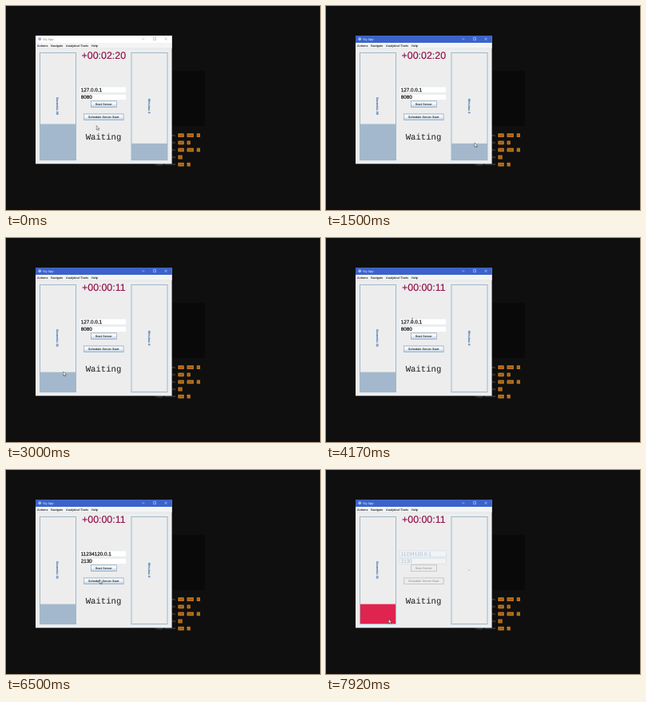
Write an HTML page that moves like this. It is 393 by 255 pixels and loops after 8000 ms.

```html
<!DOCTYPE html>
<html lang="en">
<head>
<meta charset="utf-8">
<title>My App</title>
<style>
  html, body { margin: 0; width: 100%; height: 100%; overflow: hidden; background: #0f0f0f; }
  svg { display: block; width: 393px; height: 255px; }
  text { font-family: "Liberation Sans", Arial, sans-serif; text-rendering: geometricPrecision; white-space: pre; }
  .mid { text-anchor: middle; }
  .small { font-size: 3.7px; font-weight: 700; fill: #2c2c2c; }
  .hint { font-size: 3.7px; fill: #666; text-anchor: end; }
  .key { fill: #bd7420; }
  .keytext { font-size: 2.8px; fill: #5a3608; text-anchor: middle; }
  .clock { font-size: 12.4px; fill: #8c0a42; stroke: #8c0a42; stroke-width: .12; }
  .status { font: 400 10.6px "Liberation Mono", "Courier New", monospace; fill: #1c1c1c; }
  .bar { fill: none; stroke: #9db8cc; stroke-width: 1; }
  .fill { fill: #a3b8cc; }
  .barlabel { font-size: 3.75px; font-weight: 700; fill: #4f7cb0; stroke: #4f7cb0; stroke-width: .15; text-anchor: middle; }
  .field rect { fill: #fff; stroke: #dde1e5; stroke-width: .4; }
  .field text { font-size: 6.3px; fill: #1c1c1c; stroke: #1c1c1c; stroke-width: .25; }
  .field .sel { fill: #b8cfe5; stroke: none; }
  .field .caret { stroke: #222; stroke-width: .3; }
  .button rect { fill: url(#face); stroke: #849bb4; stroke-width: .6; }
  .button.pressed rect { fill: #a9c2da; }
  .off .field rect { fill: #f3f3f3; stroke: #b8cfe5; }
  .off .field text { fill: #9db9d3; stroke: none; }
  .off .button rect { fill: #ececec; stroke: #b0b0b0; }
  .off .button text { fill: #a2a2a2; }
  .off #secFill { fill: #e02450; }
  #bar { fill: #fff; }
  .chrome { fill: none; stroke: #999; stroke-width: .5; }
  .title { font-size: 4px; fill: #888; }
  .active #bar { fill: #3b63c9; }
  .active .chrome { stroke: #e8eefc; }
  .active .title { fill: #e8eefc; }
</style>
</head>
<body>
<svg viewBox="0 0 393 255">
  <defs>
    <linearGradient id="face" x2="0" y2="1">
      <stop offset="0" stop-color="#e2ebf4"/>
      <stop offset=".35" stop-color="#fbfdff"/>
      <stop offset="1" stop-color="#b8cfe5"/>
    </linearGradient>
  </defs>
  <rect width="393" height="255" fill="#0f0f0f"/>
  <rect x="180" y="81" width="69" height="69" fill="#090909"/>
  <g id="hints"></g>

  <g id="app">
    <rect x="37" y="37" width="170.6" height="160.3" fill="#ededed"/>
    <rect id="bar" x="37" y="37" width="170.6" height="9"/>
    <circle cx="42.2" cy="41.3" r="2" fill="#a9b4cc"/>
    <text class="title" x="46.2" y="42.7">My App</text>
    <path class="chrome" d="M170.3 41.2h3M184.6 39.6h3v3h-3zM198.6 39.6l3 3m0-3l-3 3"/>
    <rect x="37" y="46" width="170.6" height="6.8" fill="#f4f4f4"/>
    <path d="M37 52.9h170.6" stroke="#d8d8d8" stroke-width=".4"/>
    <g class="small">
      <text x="39" y="50.6">Actions</text>
      <text x="56" y="50.6">Navigate</text>
      <text x="75" y="50.6">Analytical Tools</text>
      <text x="107" y="50.6">Help</text>
    </g>

    <rect id="secFill" class="fill" x="42.5" width="45"/>
    <rect class="bar" x="42.5" y="58.5" width="45" height="134"/>
    <text id="secLabel" class="barlabel" transform="translate(63.3 125) rotate(90)"></text>
    <rect id="minFill" class="fill" x="157" width="45"/>
    <rect class="bar" x="157" y="58.5" width="45" height="134"/>
    <text id="minLabel" class="barlabel" transform="translate(177.8 125) rotate(90)"></text>

    <text id="clock" class="clock mid" x="122.3" y="66.4"></text>
    <g id="host" class="field" transform="translate(92 101)"></g>
    <g id="port" class="field" transform="translate(92 110.4)"></g>
    <g class="button">
      <rect x="106.3" y="118.8" width="32" height="7.7"/>
      <text class="small mid" x="122.3" y="124">Start Server</text>
    </g>
    <g id="schedule" class="button">
      <rect x="97.3" y="134.9" width="49.8" height="7.7"/>
      <text class="small mid" x="122.2" y="140.2">Schedule Server Start</text>
    </g>
    <text class="status mid" x="122" y="166.6">Waiting</text>
  </g>

  <g id="cursor">
    <path id="arrow" d="M0 0V5.2L1.2 4.1 2 6 2.9 5.6 2.1 3.8H3.7Z" fill="#fff" stroke="#222" stroke-width=".45"/>
    <path id="beam" d="M-.9 0H.9M0 0V5.4M-.9 5.4H.9" fill="none" stroke="#222" stroke-width=".4"/>
  </g>
</svg>
<script>
const LOOP = 8000, STEP = 1000 / 12;
const BOTTOM = 192.2, SEC_UNIT = 134 / 60, MIN_UNIT = 10.2, EM = 6.3;
const $ = id => document.getElementById(id);

// time, x, y of the pointer tip
const path = [
  [0, 113.3, 149.6], [40, 113.3, 149.6], [420, 172.3, 168],
  [900, 172.3, 168], [1250, 185.7, 163], [1340, 185.7, 163], [1500, 186, 171],
  [1670, 186, 171], [1920, 186, 192], [2000, 183, 197], [2500, 71, 153],
  [2670, 71.3, 154], [3000, 71.7, 167], [3250, 71.7, 167], [3580, 143, 134],
  [3670, 143, 134], [3920, 108, 100], [4250, 108, 100.3], [4500, 98, 101.3],
  [5750, 98, 101.3], [5830, 104.5, 111], [5920, 94.5, 111.2],
  [6250, 94.5, 111.2], [6500, 117.2, 137], [7580, 117.2, 137], [7920, 78, 187]
];
const minutes = [[0, 2], [1830, 1], [1910, 0]];
const seconds = [[0, 20], [2750, 17], [2830, 15], [2910, 13], [3000, 11]];
// time, text, caret index, selection anchor
const host = [
  [0, "127.0.0.1"], [4330, "127.0.0.1", 3, 4], [4410, "127.0.0.1", 2, 4],
  [4500, "127.0.0.1", 1, 4], ...typed([5250, 5410, 5500, 5580, 5660, 5750], "1", "123412", "0.0.1"),
  [5830, "11234120.0.1"]
];
const port = [
  [0, "8080"], [5830, "8080", 3, 3], [5910, "8080", 0, 3],
  ...typed([6080, 6160, 6250], "", "213", "0"), [6660, "2130"]
];

function typed(times, before, word, after) {
  return times.map((at, i) => {
    const head = before + word.slice(0, i + 1);
    return [at, head + after, head.length];
  });
}

function at(list, t) {
  let now = list[0];
  for (const item of list) if (item[0] <= t) now = item;
  return now;
}

function pointer(t) {
  const i = path.findIndex(p => p[0] > t);
  if (i < 0) return path[path.length - 1].slice(1);
  const [a, b] = [path[i - 1], path[i]];
  const k = (t - a[0]) / (b[0] - a[0]);
  return [1, 2].map(n => a[n] + (b[n] - a[n]) * k);
}

const widthOf = s => [...s].reduce((w, c) => w + (c === "." ? .278 : .556), 0) * EM;

function drawField(id, [, text, caret, anchor = caret]) {
  const x = n => 1.8 + widthOf(text.slice(0, n));
  let marks = "";
  if (caret !== undefined) {
    marks = `<rect class="sel" x="${x(caret)}" y=".6" width="${x(anchor) - x(caret)}" height="6"/>` +
      `<path class="caret" d="M${x(caret)} .7v5.8"/>`;
  }
  $(id).innerHTML = `<rect width="58.5" height="7.2"/>${marks}<text x="1.8" y="5.9">${text}</text>`;
}

function setFill(id, height) {
  $(id).setAttribute("y", BOTTOM - height);
  $(id).setAttribute("height", height);
}

function drawHints() {
  const rows = [
    ["Show All Commands", "Ctrl", "Shift", "P"], ["Go to File", "Ctrl", "P"],
    ["Find in Files", "Ctrl", "Shift", "F"], ["Start Debugging", "F5"], ["Toggle Terminal", "Ctrl", "`"]
  ];
  const widths = { Ctrl: 7.5, Shift: 8.5, F5: 5.5 };
  $("hints").innerHTML = rows.map(([name, ...keys], i) => {
    const y = 161.7 + i * 9.1;
    let x = 215.3;
    return `<text class="hint" x="212" y="${y + 1.2}">${name}</text>` + keys.map(key => {
      const w = widths[key] || 4.3, left = x;
      x += w + 3.7;
      return `<rect class="key" x="${left}" y="${y - 2.4}" width="${w}" height="4.8" rx=".6"/>` +
        `<text class="keytext" x="${left + w / 2}" y="${y + 1}">${key}</text>`;
    }).join("");
  }).join("");
}

function render(t) {
  const off = t >= 7250;
  const m = at(minutes, t)[1], s = at(seconds, t)[1];
  const pad = n => String(n).padStart(2, "0");
  $("app").setAttribute("class", (t >= 660 ? "active " : "") + (off ? "off" : ""));
  $("clock").textContent = `+00:${pad(m)}:${pad(s)}`;
  $("secLabel").textContent = `Seconds: ${s}`;
  $("minLabel").textContent = off ? "-" : `Minutes: ${m}`;
  setFill("secFill", s * SEC_UNIT);
  setFill("minFill", m * MIN_UNIT);
  drawField("host", at(host, t));
  drawField("port", at(port, t));
  $("schedule").classList.toggle("pressed", t >= 7160 && !off);

  const [x, y] = pointer(t);
  const overText = t >= 4080 && t < 6300;
  $("cursor").setAttribute("transform", `translate(${x} ${y})`);
  $("arrow").style.display = overText ? "none" : "";
  $("beam").style.display = overText ? "" : "none";
}

const start = performance.now();
let last = -1;
function tick() {
  const t = (performance.now() - start) % LOOP;
  const step = Math.floor((t + 4) / STEP);
  if (step !== last) render(Math.min(step * STEP, LOOP - 1));
  last = step;
  requestAnimationFrame(tick);
}
drawHints();
tick();
</script>
</body>
</html>
```
